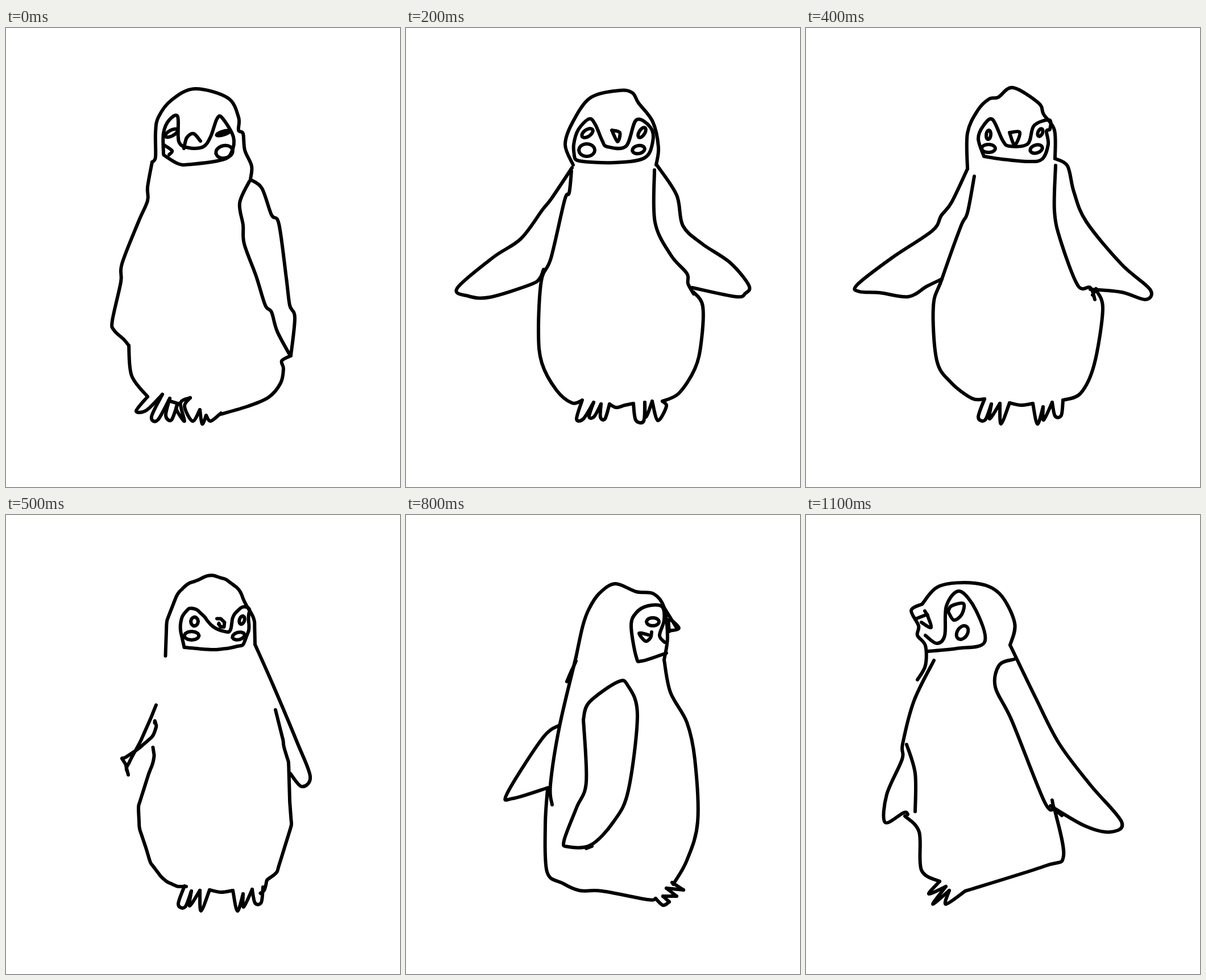
These frames come from a looping animation (693 px wide and 808 px high, 1200 ms). An HTML page with a canvas:

```html
<!DOCTYPE html>
<html lang="en">
<head>
<meta charset="utf-8">
<title>Turning penguin</title>
<style>
html, body { margin: 0; width: 100%; height: 100%; overflow: hidden; background: #fff; }
canvas { display: block; }
</style>
</head>
<body>
<canvas id="stage" width="693" height="808"></canvas>
<script>
const ctx = document.getElementById("stage").getContext("2d");
const STEP = 100;
let out;

// A sketch is the list of strokes that its function puts down
const sketch = fn => { out = []; fn(); return out; };

// Smooth stroke; "|" marks a sharp corner at the point before it
function line(text) {
  let last = [];
  for (const part of text.split("|")) {
    const pts = part.split(" ").map(p => p.split(",").map(Number));
    out.push([...last, ...pts]);
    last = pts.slice(-1);
  }
}

function oval(x, y, rx, ry, tilt = 0) {
  const c = Math.cos(tilt), s = Math.sin(tilt);
  out.push(Array.from({ length: 13 }, (_, i) => {
    const a = Math.PI * (1 + i / 6), u = rx * Math.cos(a), v = ry * Math.sin(a);
    return [x + u * c - v * s, y + u * s + v * c];
  }));
}

// Evenly spaced points along a stroke
function resample(pts, n = 45) {
  const at = [0];
  for (let i = 1; i < pts.length; i++)
    at.push(at[i - 1] + Math.hypot(pts[i][0] - pts[i - 1][0], pts[i][1] - pts[i - 1][1]));
  let k = 1;
  return Array.from({ length: n }, (_, i) => {
    const d = at[at.length - 1] * i / (n - 1);
    while (k < pts.length - 1 && at[k] < d) k++;
    const u = (d - at[k - 1]) / (at[k] - at[k - 1]);
    return pts[k].map((v, j) => pts[k - 1][j] + (v - pts[k - 1][j]) * u);
  });
}

// Halfway between two sketches, as far as both have strokes
const mix = (a, b) => a.slice(0, b.length).map((s, i) => {
  const q = resample(b[i]);
  return resample(s).map((p, j) => p.map((v, c) => (v + q[j][c]) / 2));
});

const mirror = strokes => strokes.map(s => s.map(([x, y]) => [691 - x, y]));

// Faces: mask, left eye, left cheek, beak, right eye, right cheek
const faceA = sketch(() => {
  line("277,222 277,185 287,162 302,156 304,200 322,211 347,209 360,191 371,160 380,158 400,192 396,220 380,232 325,240 303,239 278,224");
  oval(291, 185, 12, 5, -.5);
  line("278,206 292,216 287,223");
  line("313,212 318,193 330,186 342,199");
  oval(382, 185, 12, 3, -.3);
  oval(384, 218, 15, 11, -.2);
});
const faceB = sketch(() => {
  line("296,225 295,205 303,179 322,160 333,170 345,198 354,209 387,208 405,162 430,175 434,200 419,229 365,237 305,234 296,225");
  oval(319, 185, 11, 6, -.6);
  oval(318, 215, 14, 11);
  line("362,180 376,184 372,200 362,180");
  oval(415, 184, 10, 5, -1);
  oval(409, 214, 11, 7, -.2);
});
const faceC = sketch(() => {
  line("313,226 303,195 312,172 328,161 346,198 358,208 390,204 401,172 428,162 429,178 423,182 426,205 415,231 390,235 345,231 313,226");
  oval(321, 188, 4, 8, .1);
  oval(321, 212, 12, 7);
  line("358,184 376,184 367,206 358,184");
  oval(412, 184, 4, 7, .4);
  oval(405, 213, 11, 7, -.3);
});
const faceD = sketch(() => {
  line("314,240 307,188 316,168 337,159 357,167 380,202 398,210 398,185 407,160 428,160 430,195 420,226 395,234 368,242 314,240");
  oval(342, 187, 9, 8);
  oval(332, 213, 14, 8);
  line("384,181 391,181 394,203 384,181 390,200");
  oval(418, 186, 5, 8, .2);
  oval(413, 213, 11, 6, -.2);
});
const faceE = sketch(() => {
  line("458,243 415,257 405,250 396,195 405,172 425,160 450,161 454,185 446,212 455,224");
  oval(434, 188, 11, 7);
  line("432,206 430,216 421,222 410,208 426,211");
  line("463,205 463,184 480,199 463,204");
});

// Front poses: head, left wing, left side, right side, right inner, right wing
const bodyA = sketch(() => {
  line("257,236 263,227 263,184 268,157 291,127 332,107 390,123 409,157 409,180 417,186 420,215 432,243 430,266");
  line("257,236 249,280 249,304 233,341 204,415 202,447 187,515 190,532 207,548 216,559");
  line("216,559 221,612 249,649");
  line("377,680 425,666 462,650 483,625 488,600 485,586 501,577");
  line("428,270 411,308 417,347 419,380 440,437 456,488 467,500 477,534 500,577");
  line("430,267 450,282 467,329 480,345 493,440 499,488 508,510 501,577");
});
const bodyB = sketch(() => {
  line("294,241 280,206 292,168 324,123 375,110 398,114 409,132 434,165 444,210 440,241");
  line("292,246 256,300 240,320 202,371 153,404 90,458 110,472 147,474 218,452 235,441 242,425");
  line("291,252 287,290 279,303 255,405 238,445 233,535 239,590 265,638 292,660 309,656");
  line("451,657 480,643 508,600 519,555 522,490 506,465");
  line("437,250 438,342 466,400 494,432 496,450 506,468");
  line("441,241 476,294 487,348 521,380 570,413 603,453 597,467 580,473 503,457");
  line("237,444 241,428");
});
const bodyC = sketch(() => {
  line("284,248 284,185 302,145 322,125 338,122 364,105 409,132 418,152 437,180 438,230");
  line("284,248 256,307 238,330 222,357 152,404 90,452 94,464 130,466 180,473 212,455 239,442");
  line("296,261 284,325 272,350 239,442 224,490 230,585 255,624 292,652 314,653");
  line("452,655 483,643 507,592 522,495 510,461");
  line("439,242 437,322 448,375 478,453 500,457 508,478");
  line("438,230 460,243 471,288 493,341 555,416 605,460 597,478 555,465 500,460");
  line("504,470 510,459");
});

const feetA = sketch(() => line("249,649 229,674 247,673 275,645|256,684 267,690 288,652|281,682 291,690 302,661|286,656|302,661|300,672 314,692 307,660 324,651|314,666 328,692 341,672|345,697 352,682|360,692 378,678"));
const feetB = sketch(() => line("310,655 300,688 312,688 330,659|322,684 331,684 343,662|342,685 350,688 358,662|370,668 385,664 400,661|404,690 418,692 420,659|422,685 433,657|443,691 458,666 451,657"));
const feetC = sketch(() => line("314,653 303,685 315,690 326,662|323,688 341,661|343,697 358,660|378,664 399,661|407,697 417,667|418,690 433,659|438,683 449,682 452,655"));

// Right-turned poses: head, wing, left side, right side, back
const bodyD = sketch(() => {
  line("277,248 281,190 300,133 320,114 347,105 387,108 413,132 420,155 437,185 438,225");
  line("244,421 235,447 217,490 195,546 213,556 250,510 293,456 341,355 348,310 335,277 310,269 284,290");
  line("221,557 234,542 222,597 265,627 298,657 320,655");
  line("443,677 452,668 447,637 469,617 497,500 487,445 476,350 456,314 438,225");
  line("277,248 282,262 267,327 245,378 239,433");
});
const bodyE = sketch(() => {
  line("299,250 311,195 322,165 340,138 368,121 405,135 436,139 454,163 460,215 454,255");
  line("312,360 317,470 300,515 278,573 285,584 325,581 365,540 391,485 407,352 390,300 372,294 322,330 312,360");
  line("249,482 245,545 248,628 275,648 305,661 345,662 425,677 439,675");
  line("470,650 494,608 513,540 508,430 494,365 465,312 454,255");
  line("299,250 270,372 254,475 257,510");
});
const tailE = sketch(() => {
  line("270,370 240,393 178,490 188,499 250,480");
  line("299,257 283,293 292,272");
  line("454,163 475,197");
  line("317,587 327,583");
});
const feetD = sketch(() => line("320,655 328,678 360,697|349,670 363,693 364,677|370,691 382,672 374,657|406,655 417,683 428,684|427,656 430,681 435,660|439,677 446,664"));
const feetE = sketch(() => line("439,675 452,687 463,681|452,671|476,671|458,657|488,660|468,647"));

const outerWing = sketch(() => line("438,228 470,300 512,400 535,460 520,478 500,455"));

const backHalf = sketch(() => {
  line("345,114 296,145 280,215 285,248 245,340 131,485 150,500 225,472 243,450");
  line("284,262 264,380 234,560 240,610 302,656|300,684 313,667|319,685 327,667|335,678 337,660 346,661");
});

const leftSide = sketch(() => {
  line("237,180 252,139 306,127 367,149 400,205 391,242|408,320 416,352 435,386 447,450 443,498");
  line("443,490 451,520 447,610 420,659 335,661 265,656|234,681 245,659|223,664 235,651|203,657 229,633|202,598 179,500 178,450 210,315 252,215");
  line("236,173 228,183 211,189 232,191");
  line("236,190 234,203 243,222 236,232 240,241");
  line("252,215 245,180 257,152 285,152 298,185 295,230 283,245 241,240");
  oval(268, 174, 10, 8, -.6);
  oval(279, 202, 10, 8, -.5);
  line("421,569 415,567 417,578 395,583 335,530 298,435 290,345 302,299 335,282 374,310 369,400 383,487 417,566");
  line("436,388 465,408 492,443 515,488 497,503 470,490 445,489");
});

const leftTurn = sketch(() => {
  line("204,157 185,168 198,195 196,212 210,230 210,265 196,290");
  line("204,157 235,125 297,120 340,138 367,190 359,229|404,322 445,402 500,475 555,540 535,558 490,547 430,512");
  line("366,254 340,264 333,303 362,362 419,504 437,517|453,600 420,618 280,662|246,685 252,661|223,685 246,654|216,667 235,645|203,625 199,558 174,530");
  line("433,502 437,517 450,529");
  line("225,256 190,327 170,403 169,430 142,492 139,541 172,524 179,527");
  line("177,404 192,455 192,522");
  line("213,240 265,235 314,224 299,168 270,134 247,160 244,212 230,226 210,212");
  line("250,170 256,160 277,156 274,175 260,185 250,170");
  oval(275, 207, 13, 9, -1);
  line("195,182 213,175|220,198 203,189");
  line("209,169 214,177");
});

const frontB = [...bodyB, ...feetB, ...faceB];
const frontC = [...bodyC, ...feetC, ...faceC];
const poses = [
  [...bodyA, ...feetA, ...faceA],
  [...mix(bodyA, bodyB), ...feetB, ...mix(faceA, faceB)],
  frontB,
  mix(frontB, frontC),
  frontC,
  [...mix(bodyC.slice(0, 4), bodyD), ...outerWing, ...feetC, ...mix(faceC, faceD)],
  [...bodyD, ...feetD, ...faceD],
  [...mix(bodyD, bodyE), ...mix(feetD, feetE), ...mix(faceD, faceE)],
  [...bodyE, ...tailE, ...feetE, ...faceE],
  [...backHalf, ...mirror(backHalf)],
  leftSide,
  leftTurn
];

// Smooth curve through every point
function drawStroke(p) {
  ctx.beginPath();
  ctx.moveTo(...p[0]);
  for (let i = 0; i < p.length - 1; i++) {
    const a = p[i - 1] || p[i], b = p[i], c = p[i + 1], d = p[i + 2] || c;
    ctx.bezierCurveTo(b[0] + (c[0] - a[0]) / 6, b[1] + (c[1] - a[1]) / 6,
      c[0] - (d[0] - b[0]) / 6, c[1] - (d[1] - b[1]) / 6, c[0], c[1]);
  }
  ctx.stroke();
}

ctx.lineWidth = 6;
ctx.lineCap = ctx.lineJoin = "round";
const start = performance.now();

function draw() {
  const t = Math.max(0, performance.now() - start);
  ctx.fillStyle = "#fff";
  ctx.fillRect(0, 0, 693, 808);
  poses[Math.floor(t / STEP) % poses.length].forEach(drawStroke);
  requestAnimationFrame(draw);
}
draw();
</script>
</body>
</html>
```
